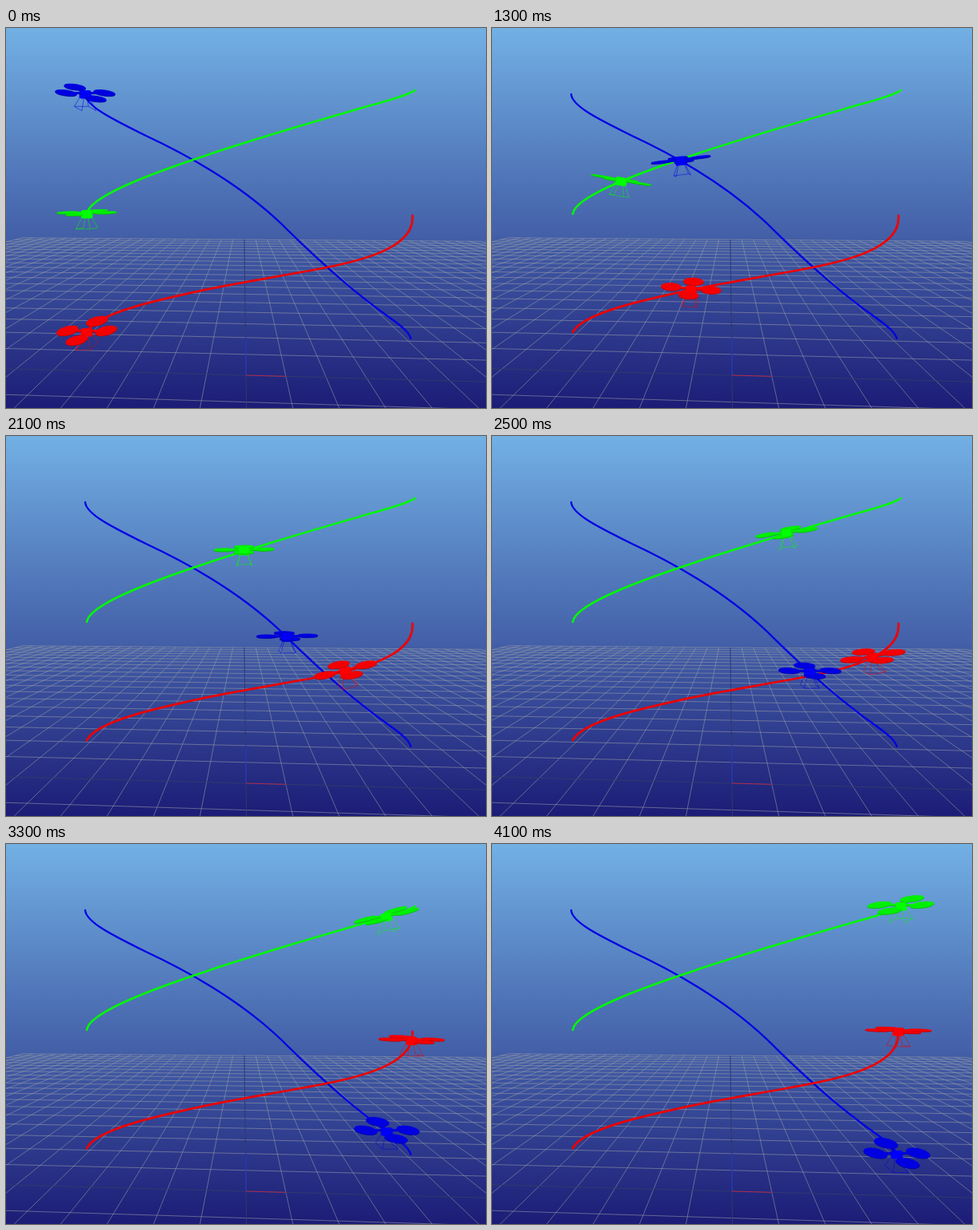
Recreate the animation shown at these times as an HTML page. Size 600x476 px, loop 4200 ms.

```html
<!DOCTYPE html>
<html lang="en">
<head>
<meta charset="utf-8">
<title>Three drones</title>
<style>
  html, body { margin: 0; width: 100%; height: 100%; overflow: hidden; background: #1c1c78; }
  svg { display: block; width: 600px; height: 476px; }
  .plate * { vector-effect: non-scaling-stroke; }
</style>
</head>
<body>
<svg id="stage" viewBox="0 0 600 476">
  <defs>
    <linearGradient id="sky" x1="0" y1="0" x2="0" y2="1">
      <stop offset="0" stop-color="#72b0e4"/>
      <stop offset="1" stop-color="#1c1c76"/>
    </linearGradient>
  </defs>
  <rect width="600" height="476" fill="url(#sky)"/>
</svg>
<script>
const LOOP = 4200, STEP = 100, END = 4100;
const ORIGIN = { x: 300, y: 435 };
const VANISH = { x: 297, y: 196 };   // where lines of depth meet
const SIDE_X = -8440;                // where the rows meet, far to the left
const stage = document.getElementById('stage');

function add(parent, tag, attrs) {
  const el = document.createElementNS('http://www.w3.org/2000/svg', tag);
  for (const k in attrs) el.setAttribute(k, attrs[k]);
  parent.appendChild(el);
  return el;
}
const trace = pts => 'M' + pts.map(p => `${p[0].toFixed(2)} ${p[1].toFixed(2)}`).join('L');

// Ground plane in perspective: one unit is one grid cell.
function ground(x, y) {
  const a = -0.00567 * x, b = 0.1232 * y, w = 1 + a + b;
  return [(ORIGIN.x + a * SIDE_X + b * VANISH.x) / w,
          (ORIGIN.y + (a + b) * VANISH.y) / w];
}

function drawGround() {
  let lines = '', axes = '';
  for (let i = -20; i <= 20; i++) {
    const column = trace([ground(i, 20), ground(i, -4)]);
    const row = i > -4 ? trace([ground(-20, i), ground(20, i)]) : '';
    if (i) lines += column + row; else axes += column + row;
  }
  const line = (d, stroke, width, opacity = 1) => add(stage, 'path',
    { d, fill: 'none', stroke, 'stroke-width': width, 'stroke-opacity': opacity });
  line(lines, '#979ba6', 0.8, 0.72);
  line(axes, '#303a6c', 1);
  line('M300 435V387', '#2438d0', 1);
  line(trace([[ORIGIN.x, ORIGIN.y], ground(1, 0)]), '#b02c50', 1);
}

// Monotone cubic interpolation, at rest at both ends.
function ease(ts, vs, t) {
  const n = ts.length;
  if (t >= ts[n - 1]) return vs[n - 1];
  let i = 0;
  while (t >= ts[i + 1]) i++;
  const slope = k => (vs[k + 1] - vs[k]) / (ts[k + 1] - ts[k]);
  const tangent = k => {
    if (k === 0 || k === n - 1) return 0;
    const a = slope(k - 1), b = slope(k);
    return 2 * a * b / (a + b || 1);
  };
  const h = ts[i + 1] - ts[i], s = (t - ts[i]) / h, s2 = s * s, s3 = s2 * s;
  return (2 * s3 - 3 * s2 + 1) * vs[i] + (s3 - 2 * s2 + s) * h * tangent(i)
       + (3 * s2 - 2 * s3) * vs[i + 1] + (s3 - s2) * h * tangent(i + 1);
}

// along: share of the curve flown at each of TIMES.
// roll: sideways swing with its size, its length as a share of the flight, and its decay.
const TIMES = [0, 800, 1300, 2100, 2500, 3300, END];
const FLIGHTS = [
  {
    line: '#0000e4', body: '#0000fa', rotor: '#0000e0', edge: '#0000b4', width: 2.3,
    curve: 'M99 83C100 99 140 117.5 175 135C235 163 297 200 345 246'
         + 'C390 291 440 335 480 363C498 376 504 382 506 389',
    along: [0, 0.105, 0.317, 0.597, 0.72, 0.918, 1],
    roll: { size: 0.65, span: 0.55, decay: 1 }
  },
  {
    line: '#00fa00', body: '#00ff00', rotor: '#00f000', edge: '#00c400', width: 2.6,
    curve: 'M101 233C103 212 178 184 234 165C312 138 395 114.5 470 93C495 85.5 506 82 511 78',
    along: [0, 0.05, 0.169, 0.495, 0.662, 0.914, 1],
    roll: { size: 0.2, span: 1, decay: 0 }
  },
  {
    line: '#ee0000', body: '#ff0000', rotor: '#f40000', edge: '#c40000', width: 2.8,
    curve: 'M101 381C114 356 195 339.5 258 326C305 316.5 352 309.5 400 300C462 288 511 270 508 235',
    along: [0, 0.106, 0.355, 0.752, 0.874, 0.974, 1],
    roll: { size: 0.36, span: 0.7, decay: 0.4 }
  }
];

function drawCurve(flight) {
  flight.path = add(stage, 'path', {
    d: flight.curve, fill: 'none', stroke: flight.line,
    'stroke-width': flight.width, 'stroke-linecap': 'round'
  });
  flight.length = flight.path.getTotalLength();
}

function buildDrone(flight) {
  const g = add(stage, 'g', {});
  const block = (w, top, h) => add(g, 'rect',
    { x: -w / 2, y: top, width: w, height: h, rx: 3, fill: flight.body });
  flight.legs = add(g, 'path', { fill: 'none', stroke: flight.line, 'stroke-width': 0.8, 'stroke-opacity': 0.65 });
  flight.hull = block(15, -5, 10.5);
  flight.plates = [flight.edge, flight.rotor].map(color => {
    const el = add(g, 'g', { class: 'plate', fill: color, stroke: color });
    add(el, 'path', { d: 'M-1 0H1M0 -1V1', 'stroke-width': 2.2 });
    for (const [cx, cy] of [[0, -1], [-1, 0], [1, 0], [0, 1]])
      add(el, 'circle', { cx, cy, r: 0.49, 'stroke-width': 0.9 });
    return el;
  });
  flight.cap = block(12, -5, 8);
}

function rollAt({ size, span, decay }, progress) {
  const s = Math.min(1, progress / span);
  return size * Math.sin(2 * Math.PI * s) * (1 - decay * s);
}

function poseDrone(flight, t) {
  const share = ease(TIMES, flight.along, t);
  const { x, y } = flight.path.getPointAtLength(share * flight.length);
  const roll = rollAt(flight.roll, t / END);

  // One rotor arm runs across the view, the other along the line of sight.
  const ux = 24 + 2.6 * share, uy = ux * roll;
  const vx = 0.065 * (x - VANISH.x), vy = 0.065 * (y - VANISH.y);

  const corner = (a, b, size, down) => [
    x + size * (a * ux + b * vx) - 0.8 * roll * down,
    y + size * (a * uy + b * vy) + down
  ];
  let d = '';
  for (const a of [-1, 1]) {
    const feet = [-1, 1].map(b => corner(a, b, 0.37, 18));
    d += trace(feet);
    feet.forEach((foot, i) => { d += trace([corner(a, i * 2 - 1, 0.15, 3), foot]); });
  }
  d += trace([corner(-1, 1, 0.37, 18), corner(1, 1, 0.37, 18)]);
  flight.legs.setAttribute('d', d);

  const turn = `translate(${x} ${y}) rotate(${Math.atan(roll) * 180 / Math.PI})`;
  flight.hull.setAttribute('transform', turn);
  flight.cap.setAttribute('transform', turn);
  flight.plates.forEach((el, i) =>
    el.setAttribute('transform', `matrix(${ux} ${uy} ${vx} ${vy} ${x} ${y - 1 - i})`));
}

drawGround();
FLIGHTS.forEach(drawCurve);
FLIGHTS.forEach(buildDrone);

function render(ms) {
  const t = Math.floor((ms % LOOP) / STEP) * STEP;
  FLIGHTS.forEach(f => poseDrone(f, t));
}

const start = performance.now();
function tick() {
  render(performance.now() - start);
  requestAnimationFrame(tick);
}
tick();
</script>
</body>
</html>
```
